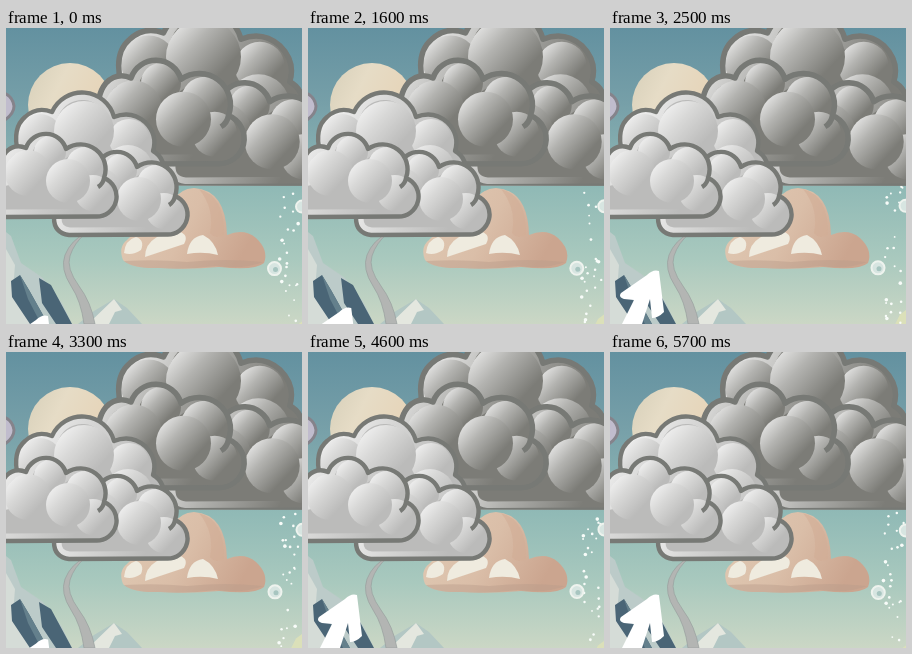
An HTML page for the animation above (5800 ms loop, 296 by 296 pixels).

```html
<!DOCTYPE html>
<html lang="en">
<head>
<meta charset="utf-8">
<title>Clouds over the mountains</title>
<style>
html, body { margin: 0; width: 100%; height: 100%; overflow: hidden; }
svg { display: block; width: 100vw; height: 100vh; }
</style>
</head>
<body>
<svg viewBox="0 0 296 296" xmlns="http://www.w3.org/2000/svg">
  <defs>
    <linearGradient id="sky" x2="0" y2="1">
      <stop stop-color="#6391a0"/><stop offset=".25" stop-color="#769fa8"/>
      <stop offset=".55" stop-color="#91bab6"/><stop offset=".78" stop-color="#a9c9be"/>
      <stop offset="1" stop-color="#cbd7c5"/>
    </linearGradient>
    <linearGradient id="moon" y2=".5">
      <stop stop-color="#d6cfb9"/><stop offset=".4" stop-color="#e6dcc6"/><stop offset="1" stop-color="#e6d2b5"/>
    </linearGradient>
    <linearGradient id="peach" x2="1" y2=".3">
      <stop stop-color="#e0cab4"/><stop offset=".55" stop-color="#dabea8"/><stop offset="1" stop-color="#cba58f"/>
    </linearGradient>
  </defs>

  <rect width="296" height="296" fill="url(#sky)"/>
  <circle cx="64" cy="77" r="42" fill="url(#moon)"/>

  <g id="peachCloud">
    <path d="M117 232Q112 219 121 212Q127 204 141 208Q150 201 163 203Q160 162 188 160Q220 162 221 207Q238 200 250 210Q263 222 258 235Q249 243 213 239Q183 242 153 240Q126 241 117 232Z" fill="url(#peach)"/>
    <path d="M193 161Q219 168 218 207Q209 212 204 205Q209 181 193 161Z" fill="#d3ad97" opacity=".6"/>
    <path d="M139 229Q139 216 151 209Q163 201 174 204Q183 207 178 216Q160 222 139 229ZM181 226Q183 209 197 207Q209 213 212 227Q197 223 181 226ZM118 225Q119 212 130 209Q139 212 135 222Q126 228 118 225Z" fill="#efebdf"/>
    <path d="M118 233Q152 231 181 234Q220 230 257 234Q237 242 210 238Q180 242 154 240Q127 241 118 233Z" fill="#b99c8b" opacity=".45"/>
  </g>

  <g id="mountains">
    <path d="M0 204L5 208L15 235L37 250L56 275L66 296H0Z" fill="#bccbc9"/>
    <path d="M0 221L9 237L7 262L28 296H0Z" fill="#d5dcd7"/>
    <path d="M72 296L88 283L108 271L121 280L136 296Z" fill="#b3c7c4"/>
    <path d="M82 296L108 271L116 282L109 284L103 296Z" fill="#e4e7df"/>
    <path d="M5 253L14 247L23 262L42 296H24L6 269ZM33 250L45 257L66 296H50L36 275Z" fill="#4a6576"/>
    <path d="M14 247L23 262L42 296H35L22 271Z" fill="#64808c"/>
  </g>
  <path d="M80 205Q65 212 59 227Q54 241 65 258Q75 273 78 296H89Q85 274 73 258Q60 240 64 228Q68 215 80 205Z" fill="#b3b5b3" stroke="#999f9e" stroke-width=".7"/>

  <path id="arrow" d="M0 0Q-6 -2 -12 4L-38 22Q-41 26 -35 28L-25 29L-37 53V75H-24L-9 28L-7 47Q-1 47 5 41Z" fill="#fff"/>
  <path id="sprout" d="M284 298L290 286L298 280V298Z" fill="#dbe0b9"/>
  <g id="snow" fill="#f8fcf9"></g>
  <g id="rings" fill="#d7e5e1" stroke="#eef3ee" stroke-width="2">
    <circle cx="268.5" cy="240" r="6.5"/><circle cx="296" cy="178" r="6"/>
    <circle cx="269.5" cy="241" r="2.5" fill="#a7c5c0" stroke="none"/>
  </g>
  <g id="clouds"></g>
</svg>
<script>
const LOOP = 5800, STEP = 100;
const byId = id => document.getElementById(id);

function add(parent, tag, attrs) {
  const el = document.createElementNS('http://www.w3.org/2000/svg', tag);
  for (const key in attrs) el.setAttribute(key, attrs[key]);
  parent.appendChild(el);
  return el;
}

function fade(id, x2, y2, colors) {
  const gradient = add(document.querySelector('defs'), 'linearGradient', { id, x2, y2 });
  colors.forEach((color, i) => add(gradient, 'stop', { offset: i / (colors.length - 1), 'stop-color': color }));
  return `url(#${id})`;
}

const BIG = {
  outline: 'M12 124Q6 100 19 89Q31 78 46 84A33 33 0 0 1 108 89Q125 82 139 94Q152 107 147 123Q160 130 158 150L125 180H20Z',
  puffs: [[34, 108, 22], [123, 111, 20], [78, 103, 30], [122, 142, 25]]
};
const SMALL = {
  outline: 'M-8 189Q-23 187 -23 172Q-22 155 -4 151Q-9 135 0 124Q9 115 20 120A21 21 0 0 1 60 121A25 25 0 0 1 98 150A20 20 0 0 1 89 188.5Z',
  puffs: [[79, 138, 19], [44, 124, 16], [22, 145, 23], [87, 165, 18], [62, 153, 22]],
  crease: 'M98 150Q97 156 92 159'
};
let clipCount = 0;

// Light comes from the upper left: a pale rim, then puffs fading into the base.
function cloud(parent, { outline, puffs, crease = '' }, paint, x = 0, y = 0) {
  const layer = add(parent, 'g', { transform: `translate(${x} ${y})` });
  const id = `clip${clipCount++}`;
  add(add(layer, 'clipPath', { id }), 'path', { d: outline });
  const inside = add(layer, 'g', { 'clip-path': `url(#${id})` });
  add(inside, 'path', { d: outline, fill: paint.base });
  add(inside, 'path', { d: outline, fill: 'none', stroke: paint.rim, 'stroke-width': 15 });
  for (const [cx, cy, r] of puffs) add(inside, 'circle', { cx, cy, r, fill: paint.puff });
  add(layer, 'path', { d: outline + crease, fill: 'none', stroke: '#777975', 'stroke-width': 4.4, 'stroke-linejoin': 'round' });
}

function cluster(name, colors, base, transform) {
  const paint = { base, puff: fade(name + 'Puff', .75, .7, colors), rim: fade(name + 'Rim', .9, .3, colors) };
  const group = add(byId('clouds'), 'g', { transform });
  cloud(group, BIG, paint);
  cloud(group, SMALL, paint, 71, 18);
  cloud(group, SMALL, paint);
}

const edge = add(document.querySelector('defs'), 'clipPath', { id: 'edge' });
add(edge, 'rect', { width: 296, height: 157.5 });
add(byId('clouds'), 'path', { d: 'M-8 64Q6 65 8 78Q8 88 -8 96Z', fill: '#c0bccd', stroke: '#85838b', 'stroke-width': 3 });
byId('clouds').setAttribute('id', 'lightClouds');
const darkLayer = add(document.querySelector('svg'), 'g', { id: 'clouds', 'clip-path': 'url(#edge)' });
cluster('dark', ['#fafafa', '#b3b3b0', '#7c7c77'], '#7c7c77', 'translate(100 -100) scale(1.25)');
darkLayer.removeAttribute('id');
byId('lightClouds').setAttribute('id', 'clouds');
byId('clouds').before(darkLayer);
cluster('light', ['#fafafa', '#d8d8d7', '#bbbbba'], '#bbbbba', '');

let seed = 41;
const random = () => (seed = seed * 16807 % 2147483647) / 2147483647;
const flakes = Array.from({ length: 24 }, (_, i) => ({
  el: add(byId('snow'), 'circle', { r: i % 6 ? .8 + random() * .6 : 1.8 }),
  x: 275 + random() * 17, y: random() * 138, turns: 1 + i % 3, phase: random() * 7
}));

// Three and a half rises per loop, each with a rest at the top.
function lift(t) {
  const u = Math.min(1, 2.5 * Math.abs(Math.sin(Math.PI * 3.5 * t / LOOP)));
  return u * u * (3 - 2 * u);
}

function draw(now) {
  const t = Math.floor(now % LOOP / STEP) * STEP, turn = t / LOOP * Math.PI * 2;
  const rise = lift(t);
  byId('arrow').setAttribute('transform', `translate(${42 + 7 * rise} ${288 - 45 * rise})`);
  byId('rings').setAttribute('transform', `translate(${Math.sin(turn * 4) * .5} ${Math.cos(turn * 3) * .6})`);
  byId('sprout').setAttribute('transform', `translate(0 ${6 + 6 * Math.cos(turn)})`);
  for (const { el, x, y, turns, phase } of flakes) {
    el.setAttribute('cx', x + 2 * Math.sin(turn * 3 + phase));
    el.setAttribute('cy', 158 + (y + t / LOOP * turns * 138) % 138);
  }
}

const start = performance.now();
function tick() {
  draw(performance.now() - start);
  requestAnimationFrame(tick);
}
tick();
</script>
</body>
</html>
```
